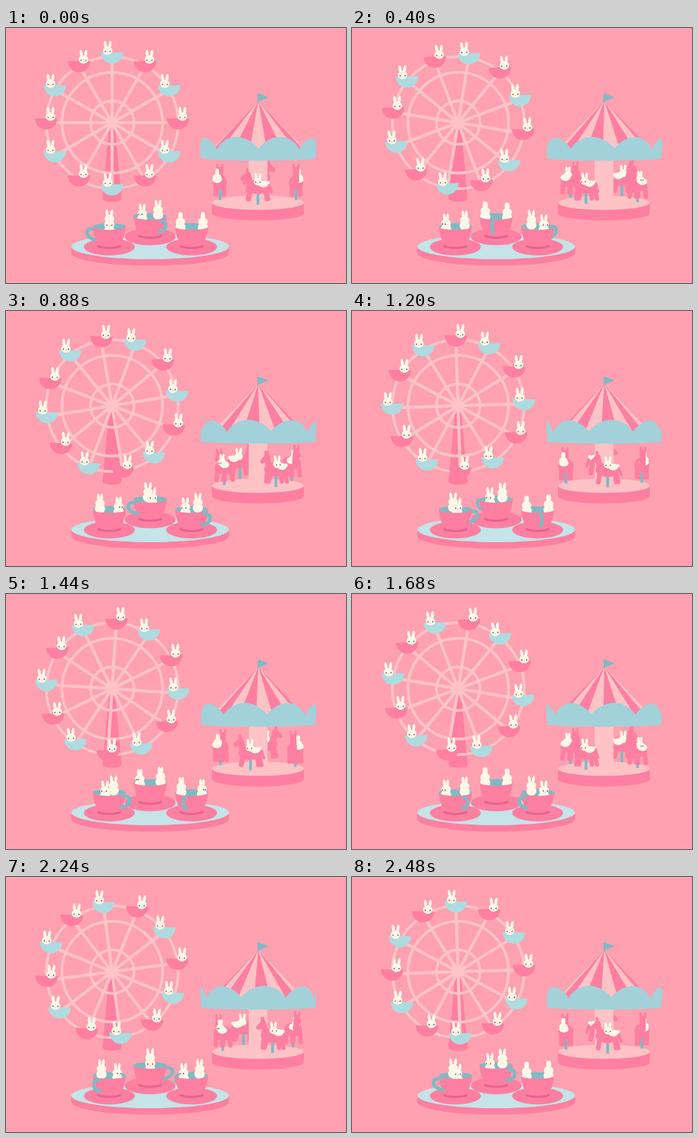
These frames come from a looping animation (500x375 px, 2560 ms). An HTML page with a canvas:

```html
<!DOCTYPE html>
<html lang="en">
<head>
<meta charset="utf-8">
<title>Bunny fairground</title>
<style>
  html, body { margin: 0; width: 100%; height: 100%; overflow: hidden; background: #ffa1b0; }
  canvas { display: block; width: 500px; height: 375px; }
</style>
</head>
<body>
<canvas id="stage" width="500" height="375"></canvas>
<script>
const ctx = document.getElementById('stage').getContext('2d');
const { sin, cos, abs, PI } = Math;
const TAU = PI * 2, LOOP = 2560, STEP = 80;
const SKY = '#ffa1b0', PINK = '#ff7fa1', PALE = '#ffc3c6', SHADE = '#e3668f',
      AQUA = '#a2d1d9', CAR = '#aedbdf', TEAL = '#7fbac4', ICE = '#c4e4e8',
      CREAM = '#fff8e8', EYE = '#6b5350';

function ellipse(x, y, rx, ry, color) {
  ctx.fillStyle = color;
  ctx.beginPath();
  ctx.ellipse(x, y, rx, ry, 0, 0, TAU);
  ctx.fill();
}

function shape(points, color) {
  ctx.fillStyle = color;
  ctx.beginPath();
  points.forEach(p => ctx.lineTo(...p));
  ctx.fill();
}

function line(x1, y1, x2, y2, width, color) {
  ctx.strokeStyle = color;
  ctx.lineWidth = width;
  ctx.beginPath();
  ctx.moveTo(x1, y1);
  ctx.lineTo(x2, y2);
  ctx.stroke();
}

// Round slab: flat top with a thick edge below it.
function slab(x, y, rx, ry, height, top, side) {
  ellipse(x, y + height, rx, ry, side);
  ctx.fillRect(x - rx, y, rx * 2, height);
  ellipse(x, y, rx, ry, top);
}

// Bunny head turned by `turn`: 0 looks at the viewer, PI/2 to the left.
function bunny(x, y, turn = 0, scale = 1) {
  const front = cos(turn), spread = 1 + 2.4 * abs(front);
  ctx.save();
  ctx.translate(x, y);
  ctx.scale(scale, scale);
  ctx.fillStyle = CREAM;
  for (const side of [-1, 1]) {
    ctx.beginPath();
    ctx.ellipse(side * spread, -8.8, 2.2, 5.6, side * 0.14 * abs(front), 0, TAU);
    ctx.fill();
  }
  ellipse(0, 0, 7, 6.2, CREAM);
  if (front > 0.25) {
    const look = -sin(turn) * 4;
    for (const side of [-1, 1]) {
      const eye = look + side * 3.6 * front;
      if (abs(eye) < 6.4) ellipse(eye, 1.2, 0.9, 1.1, EYE);
    }
    ellipse(look, 2.8, 0.8, 0.6, '#f3a0a6');
  }
  ctx.restore();
}

function ferrisWheel(t) {
  const cx = 156, cy = 139.3, radius = 97, turn = t * TAU / 6;
  const swing = -0.045 * sin(t * TAU * 2);

  shape([[152, 142], [160, 142], [170, 250], [142, 250]], PINK);
  ellipse(156, 251, 14, 4.5, PINK);

  for (const r of [radius, 74, 32]) {
    ctx.strokeStyle = PALE;
    ctx.lineWidth = 4;
    ctx.beginPath();
    ctx.arc(cx + 0.3, cy, r, 0, TAU);
    ctx.stroke();
  }
  const seats = [...Array(12).keys()].map(i => {
    const a = turn + i * TAU / 12;
    return [cx + radius * sin(a), cy - radius * cos(a), i % 2];
  });
  seats.forEach(([x, y]) => line(cx, cy, x, y, 4.5, PALE));
  ellipse(cx, cy, 9, 9, PALE);

  for (const [x, y, odd] of seats) {
    ctx.save();
    ctx.translate(x, y - 6.5);
    ctx.rotate(swing);
    ctx.fillStyle = odd ? PINK : CAR;
    ctx.beginPath();
    ctx.arc(0, 0, 16.5, 0, PI);
    ctx.fill();
    bunny(odd ? 6.5 : -6.5, -2.5);
    ctx.restore();
  }
}

function handle(angle) {
  const at = (r, h) => [-r * cos(angle), h - r * sin(angle) * 0.2];
  ctx.strokeStyle = TEAL;
  ctx.lineWidth = 5;
  ctx.beginPath();
  ctx.moveTo(...at(22, 4));
  ctx.bezierCurveTo(...at(37, 0), ...at(37, 17), ...at(19, 20));
  ctx.stroke();
}

function teacup(x, y, angle) {
  const inFront = sin(angle) < 0;
  ctx.save();
  ctx.translate(x, y);
  ellipse(0, 30, 37.5, 12.5, PINK);
  ellipse(0, 29, 18, 4, SHADE);
  if (!inFront) handle(angle);
  ellipse(0, 0, 24.5, 5, TEAL);

  [angle, angle + PI].sort((a, b) => cos(a) - cos(b)).forEach(a => {
    const bx = -16.5 * sin(a), by = -7 + 4 * cos(a);
    ellipse(bx, by + 8, 7.5, 7, CREAM);
    bunny(bx, by, a);
  });

  ctx.fillStyle = PINK;
  ctx.beginPath();
  ctx.moveTo(-24.5, 0);
  ctx.bezierCurveTo(-23, 14, -19, 24, -14, 28);
  ctx.quadraticCurveTo(0, 32, 14, 28);
  ctx.bezierCurveTo(19, 24, 23, 14, 24.5, 0);
  ctx.ellipse(0, 0, 24.5, 5, 0, 0, PI);
  ctx.fill();
  if (inFront) handle(angle);
  ctx.restore();
}

function teacups(t) {
  slab(212, 321.5, 116, 18.5, 9.5, ICE, PINK);
  teacup(212, 277, (t + 5 / 8) * TAU);
  teacup(152, 292, t * TAU);
  teacup(273, 292, (t + 1 / 4) * TAU);
}

function horse(a) {
  const forward = -cos(a), across = sin(a);
  const x = 370.5 - 56 * across, ground = 253 + 6.5 * cos(a), y = ground - 26;
  const limb = (u1, v1, u2, v2, width, shift = 0) =>
    line(x + u1 * forward + shift, y + v1, x + u2 * forward + shift, y + v2, width, PINK);
  const neck = () => {
    limb(11, -2, 15, -18, 9);
    limb(15, -18, 22, -12, 7);
    for (const side of [-1, 1]) limb(15, -19, 16, -26, 3, side * 3.5 * abs(across));
  };
  const rider = () => {
    const rx = x - 4 * across;
    ellipse(rx - 8 * forward, y - 4, 7, 5, CREAM);
    ellipse(rx - 15 * forward, y - 6, 2.5, 2.5, CREAM);
    bunny(rx, y - 7.5, a, 0.88);
  };

  ctx.fillStyle = TEAL;
  ctx.fillRect(x - 2, y, 4, ground - y);
  ellipse(x, y, 10.5 + 7.5 * abs(forward), 10.5, PINK);
  for (const side of [-1, 1]) {
    limb(side * 11, 3, side * 15, 18, 6.5, 6 * abs(across));
    limb(side * 11, 3, side * 13, 18, 6.5, -6 * abs(across));
  }
  limb(-16, -4, -20, 8, 4);
  if (across < -0.2) { rider(); neck(); } else { neck(); rider(); }
}

function canopy(turn) {
  const cx = 371, apex = [cx, 107], slice = TAU / 8;
  const base = a => [cx + 70 * sin(a), 180 + 6 * cos(a)];
  const wedge = (from, to, color) => {
    const start = Math.max(from, -PI / 2), end = Math.min(to, PI / 2);
    if (start >= end) return;
    const edge = [...Array(13).keys()].map(i => base(start + (end - start) * i / 12));
    shape([apex, ...edge], color);
  };

  wedge(-PI / 2, PI / 2, PALE);
  for (let k = -2; k <= 3; k++) {
    const middle = (k + 0.5) * slice - turn % slice;
    wedge(middle - slice / 4, middle + slice / 4, PINK);
  }

  const rim = [];
  for (let i = 0; i <= 180; i++) {
    const a = (i - 90) * PI / 180, bump = abs(sin(4 * (a + turn))) ** 0.7;
    rim.push([cx + 85.5 * sin(a), 178 - 18 * bump + 3 * (1 - cos(a))]);
  }
  for (let i = 180; i >= 0; i -= 5) {
    const a = (i - 90) * PI / 180;
    rim.push([cx + 84 * sin(a), 191.5 + 3.5 * cos(a)]);
  }
  shape(rim, AQUA);
  shape([[370, 96], [386, 102], [371.5, 108], [371.5, 110], [370, 110]], TEAL);
}

function carousel(t) {
  const turn = t * PI;
  slab(370.5, 257, 67.5, 10.5, 15.5, PALE, PINK);
  const horses = [0, 1, 2, 3].map(i => turn + i * PI / 2).sort((a, b) => cos(a) - cos(b));
  horses.filter(a => cos(a) < -0.01).forEach(horse);
  ctx.fillStyle = PALE;
  ctx.fillRect(357, 190, 27.5, 64);
  horses.filter(a => cos(a) >= -0.01).forEach(horse);
  // The canopy passes five scallops per loop.
  canopy(t * TAU * 5 / 8);
}

function draw(now) {
  const t = Math.floor(now % LOOP / STEP) * STEP / LOOP;
  ctx.lineCap = 'round';
  ctx.fillStyle = SKY;
  ctx.fillRect(0, 0, 500, 375);
  ferrisWheel(t);
  carousel(t);
  teacups(t);
  requestAnimationFrame(draw);
}
draw(performance.now());
</script>
</body>
</html>
```
